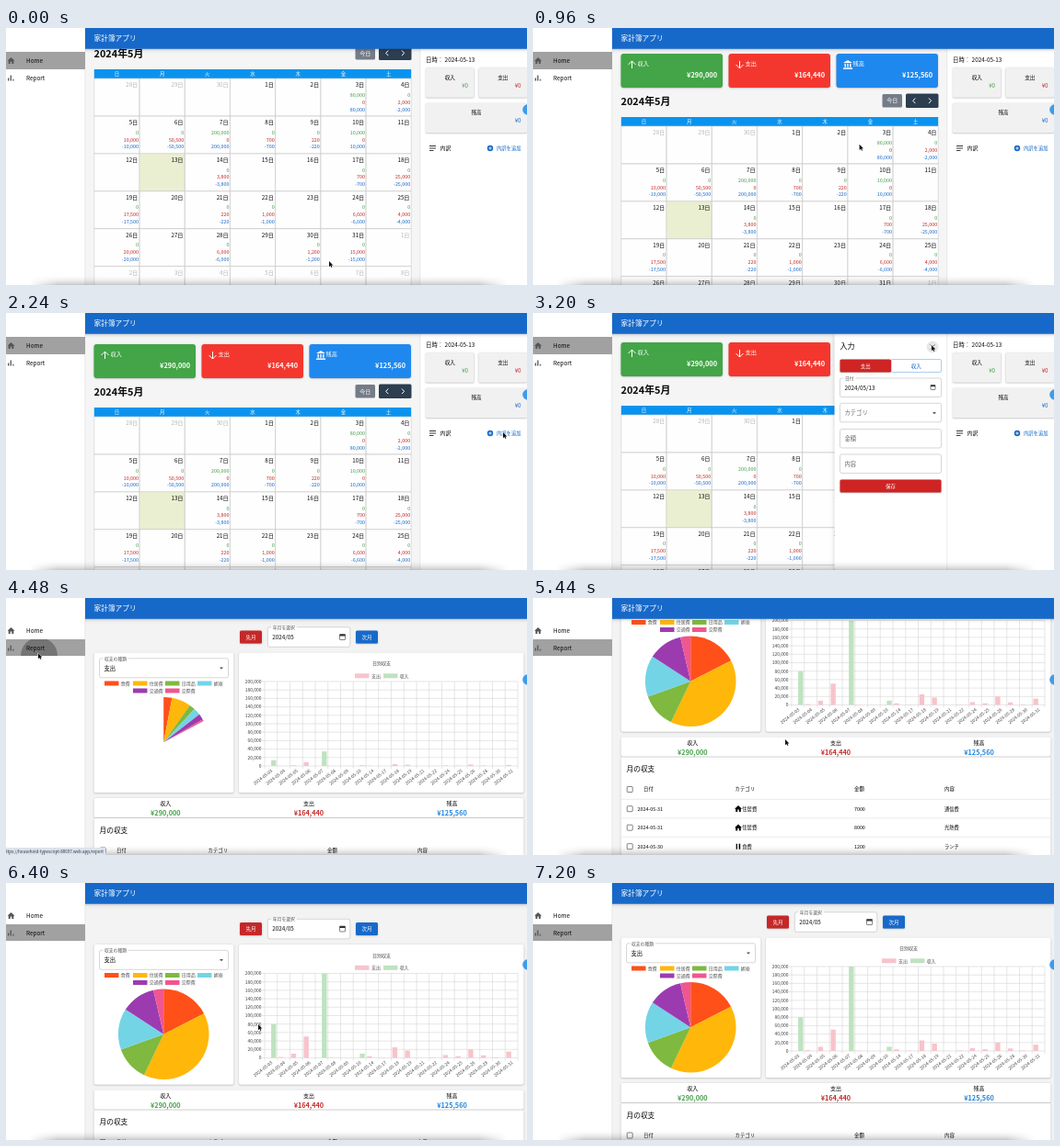
These frames come from a looping animation (566 px wide and 280 px high, 7280 ms). An HTML page with a canvas:

```html
<!DOCTYPE html>
<html lang="ja">
<head>
<meta charset="utf-8">
<title>家計簿アプリ</title>
<style>
html, body { margin: 0; width: 100%; height: 100%; overflow: hidden; background: #fff; }
canvas { display: block; width: 566px; height: 280px; }
</style>
</head>
<body>
<canvas id="stage"></canvas>
<script>
const LOOP = 7280, STEP = 80;
const ROUTE = 4434, CLICK = 4400;
const GREEN = '#43a047', RED = '#c62828', BLUE = '#1769c9', NAVY = '#2c3e50', INK = '#080808';
const canvas = document.getElementById('stage');
const ctx = canvas.getContext('2d');
const ratio = window.devicePixelRatio || 1;
canvas.width = 566 * ratio;
canvas.height = 280 * ratio;

// Day of month: [income, expense]
const days = {
  3: [80000, 0], 4: [0, 2000], 5: [0, 10000], 6: [0, 50500], 7: [200000, 0],
  8: [0, 700], 9: [0, 220], 10: [10000, 0], 14: [0, 3800], 17: [0, 700],
  18: [0, 25000], 19: [0, 17500], 21: [0, 220], 22: [0, 1000], 24: [0, 6600],
  25: [0, 4000], 26: [0, 20000], 28: [0, 6000], 30: [0, 1200], 31: [0, 15000]
};
// Label, colour, share of the pie in degrees
const groups = [
  ['食費', '#ff5019', 63], ['住居費', '#ffb70a', 142.5], ['日用品', '#7fb93f', 44.5],
  ['娯楽', '#73d4e6', 53], ['交通費', '#9c3bb0', 44], ['交際費', '#f0568f', 13]
];
const rows = [
  ['2024-05-31', '住居費', '7000', '通信費'], ['2024-05-31', '住居費', '8000', '光熱費'],
  ['2024-05-30', '食費', '1200', 'ランチ'], ['2024-05-28', '食費', '6000', '食材']
];

// Time tracks: [ms, value]
const homeScroll = [[0, 58], [320, 58], [1120, 0], [2700, 0], [3200, 2], [3600, 2], [4100, 7.5]];
const reportScroll = [[4900, 7.5], [5440, 74], [5680, 80], [5840, 80], [6320, 0], [6720, 0], [7120, 7.5]];
const drawer = [[2320, 0], [2560, 1], [3440, 1], [3640, 0]];
const mouseX = [[0, 351], [320, 351], [1120, 355], [1520, 355], [2160, 540], [2480, 540],
  [3040, 433], [3520, 433], [4240, 35], [4640, 35], [5120, 274]];
const mouseY = [[0, 254], [320, 254], [1120, 112], [1520, 112], [2160, 130], [2480, 130],
  [3040, 35], [3520, 35], [4240, 60], [4640, 60], [5120, 154], [6640, 154], [7120, 284]];

function at(track, t) {
  const i = track.findIndex(p => p[0] > t);
  if (i < 0) return track[track.length - 1][1];
  if (i === 0) return track[0][1];
  const [t0, a] = track[i - 1], [t1, b] = track[i];
  const k = (t - t0) / (t1 - t0);
  return a + (b - a) * k * k * (3 - 2 * k);
}

function text(s, x, y, size, color = INK, align = 'left', weight = 400) {
  ctx.font = `${weight} ${size}px "Noto Sans CJK JP", "Noto Sans", sans-serif`;
  ctx.textAlign = align;
  ctx.fillStyle = color;
  ctx.fillText(s, x, y + size * 0.37);
}

function rect(x, y, w, h, fill, radius = 0, stroke) {
  ctx.beginPath();
  ctx.roundRect(x, y, w, h, radius);
  if (fill) { ctx.fillStyle = fill; ctx.fill(); }
  if (stroke) { ctx.strokeStyle = stroke; ctx.lineWidth = 0.6; ctx.stroke(); }
}

function line(points, color, width = 0.6) {
  ctx.beginPath();
  points.forEach(([x, y]) => ctx.lineTo(x, y));
  ctx.strokeStyle = color;
  ctx.lineWidth = width;
  ctx.stroke();
}

function shape(points, color) {
  ctx.beginPath();
  points.forEach(([x, y]) => ctx.lineTo(x, y));
  ctx.fillStyle = color;
  ctx.fill();
}

function disc(x, y, r, color) {
  ctx.beginPath();
  ctx.arc(x, y, r, 0, 7);
  ctx.fillStyle = color;
  ctx.fill();
}

function raised(blur, draw) {
  ctx.save();
  ctx.shadowColor = 'rgba(0,0,0,.3)';
  ctx.shadowBlur = blur * ratio;
  ctx.shadowOffsetY = 0.5 * ratio;
  draw();
  ctx.restore();
}

const paper = (x, y, w, h, fill = '#fff', r = 2) => raised(1.6, () => rect(x, y, w, h, fill, r));

function button(label, x, y, w, h, color) {
  paper(x, y, w, h, color, 1.5);
  text(label, x + w / 2, y + h / 2, 5.5, '#fff', 'center', 500);
}

function field(x, y, w, h, label, value) {
  rect(x, y, w, h, '#fff', 2, '#bbb');
  if (label) {
    rect(x + 4, y - 1, label.length * 4.9 + 3, 2, '#fff');
    text(label, x + 5.5, y, 4.8, '#555');
  }
  text(value, x + 5, y + h / 2, 6.3, label ? INK : '#666');
}

const caret = (x, y) => shape([[x - 2, y - 1], [x + 2, y - 1], [x, y + 1.2]], '#555');

function dateIcon(x, y, size) {
  rect(x - size / 2, y - size / 2, size, size, null, 0.5, '#333');
  rect(x - size / 2, y - size / 2, size, size / 3, '#333');
}

function house(x, y, color) {
  shape([[x, y - 3.6], [x + 4, y], [x + 2.8, y], [x + 2.8, y + 3.2], [x + 0.8, y + 3.2],
    [x + 0.8, y + 0.8], [x - 0.8, y + 0.8], [x - 0.8, y + 3.2], [x - 2.8, y + 3.2], [x - 2.8, y], [x - 4, y]], color);
}

function arrow(x, y, dir) {
  line([[x, y + 4 * dir], [x, y - 4 * dir]], '#fff', 1);
  line([[x - 4, y], [x, y - 4 * dir], [x + 4, y]], '#fff', 1);
}

function bank(x, y) {
  shape([[x - 5, y - 2], [x, y - 5], [x + 5, y - 2]], '#fff');
  for (const dx of [-3.5, -0.7, 2.1]) rect(x + dx, y - 1.2, 1.4, 4, '#fff');
  rect(x - 5, y + 3.4, 10, 1.5, '#fff');
}

function calendar() {
  const left = 95.8, top = 113, w = 49.2, h = 40.9;
  rect(left, top, w * 7, h * 6, '#fefefe');
  rect(left, 103, w * 7, 10, '#0a93ee');
  for (let i = 0; i < 42; i++) {
    const col = i % 7, x = left + col * w, y = top + Math.floor(i / 7) * h;
    const date = new Date(2024, 3, 28 + i), day = date.getDate(), inMonth = date.getMonth() === 4;
    if (i < 7) text('日月火水木金土'[i], x + w / 2, 108.2, 5.4, '#fff', 'center', 500);
    rect(x, y, w, h, inMonth && day === 13 ? '#ebefd2' : null, 0, '#ccc');
    text(day + '日', x + w - 1.7, y + 7, 6.2, inMonth ? INK : '#b5b5b5', 'right');
    if (!inMonth || !days[day]) continue;
    const [income, expense] = days[day];
    [[income, GREEN], [expense, RED], [income - expense, BLUE]].forEach(([n, color], k) =>
      text(n.toLocaleString('en'), x + w - 1, y + 17.8 + k * 7.9, 5.35, color, 'right'));
  }
}

function home(scroll) {
  rect(86, 0, 364, 280, '#f5f5f5');
  ctx.save();
  ctx.translate(0, -scroll);
  [['収入', '¥290,000', '#43a547'], ['支出', '¥164,440', '#f4372e'], ['残高', '¥125,560', '#1f88ee']]
    .forEach(([label, sum, color], i) => {
      const x = 95.5 + i * 117;
      paper(x, 34, 110.5, 37, color, 3);
      text(label, x + 18, 45, 6.2, '#fff');
      text(sum, x + 104.5, 57.3, 7.4, '#fff', 'right', 700);
    });
  arrow(107.5, 46, 1);
  arrow(224.5, 46, -1);
  bank(342, 46);
  text('2024年5月', 95.5, 86, 10.9, INK, 'left', 700);
  rect(379.5, 78, 21.5, 14.5, '#747c88', 1.5);
  text('今日', 390.3, 85.3, 6, '#fff', 'center');
  rect(405, 77.5, 35.5, 15.5, NAVY, 1.5);
  line([[415.3, 82.5], [412.7, 85.3], [415.3, 88.1]], '#fff', 1);
  line([[430, 82.5], [432.6, 85.3], [430, 88.1]], '#fff', 1);
  calendar();
  ctx.restore();
}

function form(open, hover) {
  if (!open) return;
  ctx.save();
  ctx.translate((1 - open) * 125, 0);
  raised(5, () => rect(327.5, 22, 123, 260, '#fff'));
  text('入力', 333.5, 36, 8);
  if (hover) disc(434, 37, 6.5, '#e8e8e8');
  line([[431.5, 34.5], [436.5, 39.5]], '#555', 0.9);
  line([[436.5, 34.5], [431.5, 39.5]], '#555', 0.9);
  rect(389, 50.5, 54.5, 14, '#fff', 1.5, '#78aee5');
  button('支出', 333.5, 50.5, 55.5, 14, '#cf2424');
  text('収入', 416.3, 57.5, 5.5, BLUE, 'center');
  field(333.5, 71, 110, 20.5, '日付', '2024/05/13');
  dateIcon(434.5, 81, 5);
  field(333.5, 98.3, 110, 20.5, '', 'カテゴリ');
  caret(436, 109);
  field(333.5, 126.5, 110, 20.5, '', '金額');
  field(333.5, 154, 110, 20.5, '', '内容');
  button('保存', 333.5, 181.5, 110, 14, '#cf2424');
  ctx.restore();
}

function sidePanel() {
  rect(450, 22, 116, 258, '#fff');
  line([[449.8, 22], [449.8, 280]], '#ddd');
  text('日時： 2024-05-13', 456, 34.2, 6.4, INK, 'left', 500);
  const box = (label, x, y, w, color) => {
    paper(x, y, w, 32.5, '#f1f1f1', 1.5);
    text(label, x + w / 2, y + 10.3, 5.6, INK, 'center');
    text('¥0', x + w - 6.5, y + 19.3, 6.2, color, 'right', 500);
  };
  box('収入', 456, 43.2, 52.5, GREEN);
  box('支出', 513.5, 43.2, 52.5, RED);
  box('残高', 456, 81.8, 110, BLUE);
  for (const y of [128.5, 131, 133.5]) line([[460, y], [y > 133 ? 464.5 : 467, y]], '#222', 0.9);
  text('内訳', 471.5, 131, 5.9);
  disc(526, 131, 3.2, BLUE);
  line([[524.3, 131], [527.7, 131]], '#fff', 0.8);
  line([[526, 129.3], [526, 132.7]], '#fff', 0.8);
  text('内訳を追加', 533, 131, 5.3, BLUE, 'left', 500);
}

function pie(grow) {
  groups.forEach(([label, color], i) => {
    const x = [107, 138, 173, 208, 138, 173][i], y = i < 4 ? 100.5 : 108.5;
    rect(x, y - 2.5, 15.5, 5, color);
    text(label, x + 17.8, y, 5, '#555');
  });
  let from = -Math.PI / 2;
  for (const [, color, degrees] of groups) {
    const to = from + degrees * grow * Math.PI / 180;
    ctx.beginPath();
    ctx.moveTo(171.2, 164.7);
    ctx.arc(171.2, 164.7, 49.3, from, to);
    ctx.fillStyle = color;
    ctx.fill();
    from = to;
  }
}

function bars(grow) {
  const left = 281, right = 556, top = 98.5, base = 190.5, w = 13.75;
  const pink = '#f8c3cb', mint = '#bfe2c0', grid = '#d6d6d6';
  text('日別収支', 408, 79, 5, '#444', 'center', 500);
  rect(379, 89.8, 15.5, 5, pink);
  text('支出', 397, 92.3, 5, '#555');
  rect(410, 89.8, 15.5, 5, mint);
  text('収入', 427.5, 92.3, 5, '#555');
  for (let i = 0; i <= 10; i++) {
    const y = base - i * 9.2;
    line([[left - 3, y], [right, y]], grid);
    text((i * 20000).toLocaleString('en'), left - 3.5, y, 4.9, '#444', 'right');
  }
  for (let i = 0; i <= 20; i++) line([[left + i * w, top], [left + i * w, base + 3]], grid);
  Object.entries(days).forEach(([day, [income, expense]], i) => {
    const x = left + i * w, scale = (base - top) / 200000 * grow;
    rect(x + 1.2, base - expense * scale, 5.4, expense * scale, pink);
    rect(x + 7.1, base - income * scale, 5.4, income * scale, mint);
    ctx.save();
    ctx.translate(x + w / 2 + 1, base + 4.5);
    ctx.rotate(-0.66);
    text('2024-05-' + day.padStart(2, '0'), 0, 0, 4.8, '#444', 'right');
    ctx.restore();
  });
}

function table() {
  paper(95.5, 247.4, 467, 150);
  text('月の収支', 101.5, 260.3, 7.7, INK, 'left', 500);
  const cols = [120, 219.5, 349, 447];
  const check = y => rect(102.2, y - 3, 6, 6, null, 0.8, '#333');
  check(282.5);
  ['日付', 'カテゴリ', '金額', '内容'].forEach((s, i) => text(s, cols[i], 282.5, 5.4, INK, 'left', 500));
  line([[96, 293.3], [562, 293.3]], '#ddd');
  rows.forEach(([date, group, sum, note], i) => {
    const y = 303.7 + i * 20.5;
    check(y);
    text(date, 113.5, y, 5.35);
    if (group === '食費') {
      line([[221.3, y - 3], [221.3, y + 3]], INK, 1.3);
      line([[224.4, y - 3], [224.4, y + 3]], INK, 1.6);
    } else {
      house(223, y, INK);
    }
    text(group, 227.3, y, 5.3);
    text(sum, 349, y, 5.3);
    text(note, 447, y, 5.3);
    line([[96, y + 10.2], [562, y + 10.2]], '#ddd');
  });
}

function report(scroll, grow) {
  rect(86, 0, 480, 280, '#f3f3f3');
  ctx.save();
  ctx.translate(0, -scroll);
  button('先月', 254, 43, 24, 14, RED);
  field(284.3, 39.3, 89.5, 21.5, '年月を選択', '2024/05');
  dateIcon(365.5, 50, 6);
  button('次月', 380, 43, 24, 14, BLUE);
  paper(95.5, 67, 152, 152.8);
  paper(253, 67, 309.5, 152.8);
  field(101.5, 73.3, 140, 21, '収支の種類', '支出');
  caret(234, 84);
  pie(grow);
  bars(grow);
  paper(95.5, 225.5, 467, 21.2);
  [['収入', '¥290,000', GREEN], ['支出', '¥164,440', RED], ['残高', '¥125,560', '#1e84dc']]
    .forEach(([label, sum, color], i) => {
      const x = 173.3 + i * 155.6;
      text(label, x, 231.3, 6, INK, 'center');
      text(sum, x, 242, 7.3, color, 'center', 700);
    });
  table();
  ctx.restore();
}

function frame(t) {
  rect(0, 0, 86, 280, '#fff');
  line([[85.8, 0], [85.8, 280]], '#ddd');
  const onReport = t >= ROUTE;
  rect(0, onReport ? 45 : 26, 86, onReport ? 18 : 19, '#a1a1a1');
  const age = (t - CLICK) / 600;
  if (age > 0 && age < 1) {
    ctx.save();
    ctx.beginPath();
    ctx.rect(0, 45, 86, 18);
    ctx.clip();
    disc(36, 63, Math.min(60, age * 150), `rgba(0,0,0,${0.32 * (1 - age)})`);
    ctx.restore();
  }
  house(5.5, 35.7, '#555');
  [[2, 3], [4.6, 6], [7.2, 1.8]].forEach(([x, h]) => rect(x, 57.5 - h, 1.3, h, '#555'));
  text('Home', 22, 36.1, 6.4);
  text('Report', 22, 54.5, 6.4);

  ctx.save();
  ctx.beginPath();
  ctx.rect(86, 0, 480, 40);
  ctx.clip();
  raised(4, () => rect(80, -4, 500, 26.8, BLUE));
  ctx.restore();
  text('家計簿アプリ', 95.5, 11.5, 7.7, '#fff', 'left', 500);
  disc(567, 89, 5.8, '#3f9bea');
}

function shade() {
  for (let i = 0; i < 12; i++) {
    const g = ctx.createLinearGradient(25, 0, 545, 0), a = 0.0022 * i * i;
    g.addColorStop(0, 'rgba(60,60,60,0)');
    g.addColorStop(0.06, `rgba(60,60,60,${a})`);
    g.addColorStop(0.94, `rgba(60,60,60,${a})`);
    g.addColorStop(1, 'rgba(60,60,60,0)');
    rect(25, 268 + i, 520, 1, g);
  }
}

function pointer(x, y) {
  const points = [[0, 0], [0, 6.2], [1.5, 4.9], [2.5, 7], [3.4, 6.6], [2.5, 4.5], [4.4, 4.4], [0, 0]]
    .map(([dx, dy]) => [x + dx, y + dy]);
  line(points, '#fff', 1);
  shape(points, '#111');
}

function draw(t) {
  ctx.setTransform(ratio, 0, 0, ratio, 0, 0);
  ctx.clearRect(0, 0, 566, 280);
  if (t < ROUTE) {
    home(at(homeScroll, t));
    form(at(drawer, t), t >= 2960 && t < 3600);
    sidePanel();
  } else {
    const rest = 1 - Math.min(1, (t - ROUTE) / 1000);
    report(at(reportScroll, t), 1 - rest ** 4);
  }
  frame(t);
  shade();
  if (t >= 4160 && t < 4880) {
    rect(0, 272, 108, 8, '#dbe3ee');
    text('ttps://household-typescript-80697.web.app/report', 106, 276.2, 4.5, '#333', 'right');
  }
  pointer(at(mouseX, t), at(mouseY, t));
}

const start = performance.now();
function tick() {
  const t = (performance.now() - start) % LOOP;
  draw(Math.floor(t / STEP) * STEP);
  requestAnimationFrame(tick);
}
tick();
</script>
</body>
</html>
```
